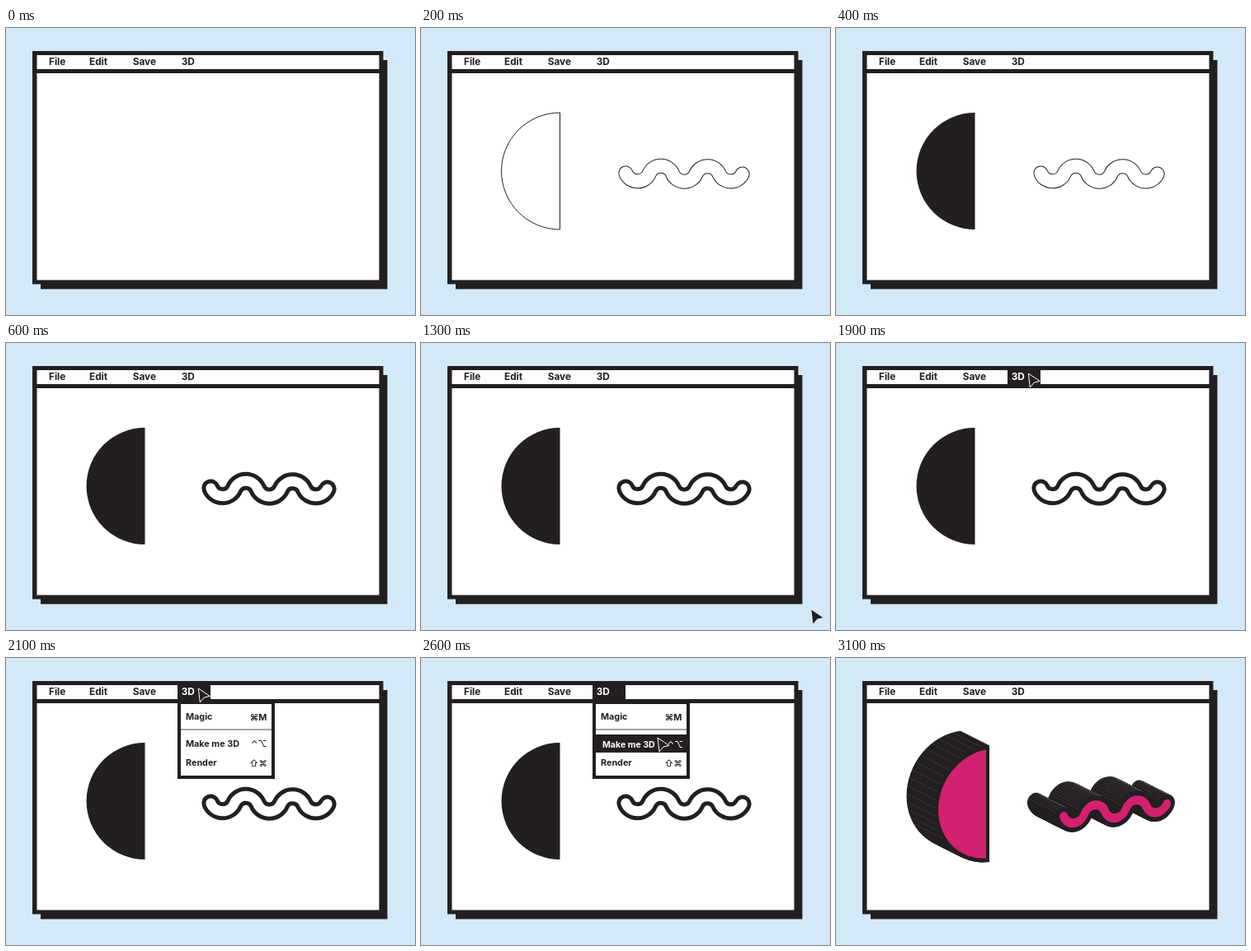
Recreate the animation shown at these times as an HTML page. Size 496 by 349 pixels, loop 4100 ms.

```html
<!DOCTYPE html>
<html lang="en">
<head>
<meta charset="utf-8">
<title>Make me 3D</title>
<style>
  html, body { margin: 0; width: 100%; height: 100%; overflow: hidden; background: #d4e9f8; }
  svg { display: block; width: 496px; height: 349px; }
  text { font: 700 11.8px Inter, "DejaVu Sans", sans-serif; fill: #231f20; }
  .menu text { font-size: 10.8px; }
  .key { text-anchor: end; }
  .menu .sym { font-weight: 500; }
  .menu .hover text { font-size: 10.6px; }
  text.inv, .hover text { fill: #fff; }
  .ink { fill: #231f20; }
  .wave { fill: none; stroke-linecap: round; }
  .edge { stroke: #5a5657; stroke-width: .4; }
  .rim { stroke: #aaa; stroke-width: .6; stroke-dasharray: 2 1; }
</style>
</head>
<body>
<svg viewBox="0 0 496 349">
  <defs>
    <path id="half" d="M168.5 103A71 71 0 0 0 168.5 245Z"/>
    <path id="wave" d="M248.3 176.5A15.4 15.4 0 0 0 276.8 177A15.4 15.4 0 0 1 305.1 177.2A15.4 15.4 0 0 0 333.5 177.4A15.4 15.4 0 0 1 361.8 177.8A15.4 15.4 0 0 0 389.7 177.5"/>
    <g id="slabHalf"><use href="#half" class="ink" transform="matrix(.93 -.115 0 1 29.3 22.4)"/></g>
    <g id="slabWave"><use href="#wave" class="wave" stroke="#231f20" stroke-width="22" transform="matrix(.885 -.115 0 1 56.3 44.5)"/></g>
  </defs>

  <rect width="496" height="349" fill="#d4e9f8"/>
  <path class="ink" d="M42 39H462.5V317.5H42ZM32 28H457.5V311.5H32Z"/>
  <path fill="#fff" d="M37.5 55H452.5V306.5H37.5Z"/>
  <path fill="#fffcff" d="M37.5 33H452.5V50H37.5Z"/>
  <text x="52" y="45">File</text>
  <text x="101" y="45">Edit</text>
  <text x="153.7" y="45">Save</text>
  <text x="212.7" y="45">3D</text>

  <use href="#half" data-on="200 400" fill="#fff" stroke="#231f20"/>
  <use href="#half" data-on="400 3100" class="ink"/>
  <g class="wave" data-on="200 600">
    <use href="#wave" stroke="#231f20" stroke-width="18"/>
    <use href="#wave" stroke="#fff" stroke-width="16"/>
  </g>
  <g class="wave" data-on="600 3100">
    <use href="#wave" stroke="#231f20" stroke-width="22"/>
    <use href="#wave" stroke="#fff" stroke-width="12"/>
  </g>

  <g data-on="1900 3100">
    <path class="ink" d="M208 33H248V50H208Z"/>
    <text class="inv" x="212.7" y="45">3D</text>
  </g>
  <g class="menu" data-on="2100 3100">
    <path class="ink" d="M208 52H326V147H208Z"/>
    <path fill="#fff" d="M212 56H322V143H212Z"/>
    <path stroke="#231f20" stroke-width=".8" d="M212 87H322"/>
    <text x="218" y="75">Magic</text><text class="key" x="316.3" y="76">⌘M</text>
    <text x="218" y="131">Render</text><text class="key sym" x="317" y="132">⇧⌘</text>
    <g data-on="2100 2600">
      <text x="218" y="108">Make me 3D</text><text class="key sym" x="316.5" y="108">⌃⌥</text>
    </g>
    <g class="hover" data-on="2600 3100">
      <path class="ink" d="M212 93H322V115H212Z"/>
      <text x="220" y="109">Make me 3D</text><text class="key sym" x="318" y="109">⌃⌥</text>
    </g>
  </g>

  <g data-on="3100 4100">
    <g id="solid"></g>
    <use href="#slabHalf"/>
    <path fill="#d4216f" transform="matrix(.93 -.115 0 1 29.3 22.4)" d="M164.2 108.1A66 66 0 0 0 164.2 239.9Z"/>
    <use href="#slabWave"/>
    <use href="#wave" class="wave" stroke="#d4216f" stroke-width="11" transform="matrix(.885 -.115 0 1 56.3 44.5)"/>
  </g>

  <path id="cursor" class="ink" d="M0 0L14 9.5L7 11L2 17Z"/>
</svg>
<script>
const LOOP = 4100;
const DEPTH = 34.5, RISE = 17.5;
const stops = [
  [1300, 473.5, 324.5], [1500, 313.5, 211], [1700, 233.3, 37], [2600, 287, 97]
];
const parts = [...document.querySelectorAll('[data-on]')].map(el => [el, ...el.dataset.on.split(' ').map(Number)]);
const cursor = document.getElementById('cursor');

// Extrude both shapes up and to the left, then rule faint lines along the sides.
let solid = '';
for (let k = 1; k >= 0; k -= 1 / 46) {
  for (const id of ['slabHalf', 'slabWave']) {
    solid += `<use href="#${id}" transform="translate(${-DEPTH * k} ${-RISE * k})"/>`;
  }
}
function rule(cx, cy, r, from, to, step, sx, e, f) {
  for (let a = from; a <= to; a += step) {
    const x = cx + r * Math.cos(a * Math.PI / 180);
    const y = cy + r * Math.sin(a * Math.PI / 180);
    const cls = a + step > to ? 'rim' : 'edge';
    solid += `<path class="${cls}" d="M${sx * x + e} ${y - .115 * x + f}l${-DEPTH} ${-RISE}"/>`;
  }
}
rule(168.5, 174, 70.5, 150, 270, 8, .93, 29.3, 22.4);
for (const [x, y, r] of [[248.3, 176.5, 10.6], [291, 183, 26], [347.6, 183.5, 26], [389.7, 177.5, 10.6]]) {
  rule(x, y, r, 210, 290, r > 20 ? 8 : 20, .885, 56.3, 44.5);
}
document.getElementById('solid').innerHTML = solid;

function draw(now) {
  const t = now % LOOP;
  for (const [el, from, to] of parts) {
    el.style.display = t >= from && t < to ? '' : 'none';
  }
  const stop = stops.filter(s => s[0] <= t).pop();
  cursor.style.display = stop && t < 3100 ? '' : 'none';
  if (stop) cursor.setAttribute('transform', `translate(${stop[1]} ${stop[2]})`);
  cursor.setAttribute('stroke', t < 1500 ? 'none' : '#fff');
}

const start = performance.now();
function frame() {
  draw(performance.now() - start);
  requestAnimationFrame(frame);
}
frame();
</script>
</body>
</html>
```
